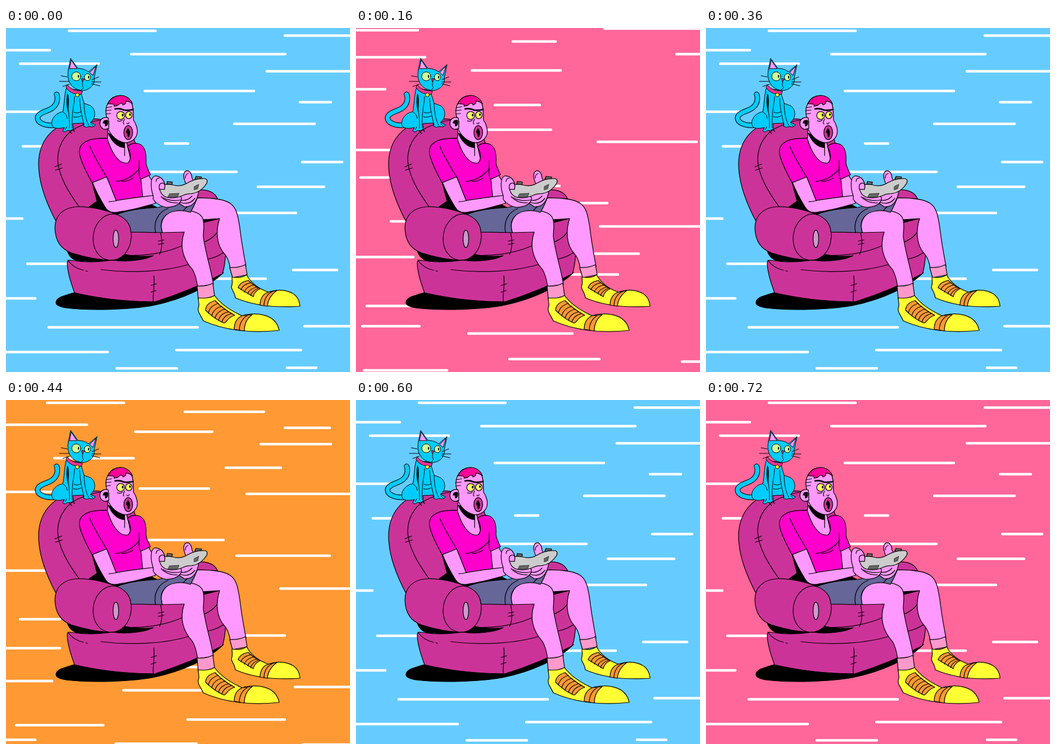
Write an HTML page that moves like this. It is 612x612 px and loops after 760 ms.

```html
<!DOCTYPE html>
<html lang="en">
<head>
<meta charset="utf-8">
<title>Gamer and cat</title>
<style>
  html, body { margin: 0; width: 100%; height: 100%; overflow: hidden; }
  svg { display: block; width: 100vw; height: 100vh; }
  .streaks path { fill: none; stroke: #fff; stroke-width: 4.5; stroke-linecap: round; visibility: hidden; }
  .ink { stroke: #000; stroke-width: 1.25; stroke-linejoin: round; stroke-linecap: round; }
  .fine { stroke-width: 1; }
  .line { fill: none; }
  .black { fill: #000; }
  .solid { stroke: none; }
  .chair { fill: #c39; }
  .skin { fill: #f9f; }
  .shirt { fill: #f0c; }
  .shorts { fill: #669; }
  .sock { fill: #f9c; }
  .shoe { fill: #ff3; }
  .lace { fill: #f93; }
  .cat { fill: #0cf; }
  .pad { fill: #ccc; }
  .key { fill: #666; }
</style>
</head>
<body>
<svg viewBox="0 0 612 612">
  <rect id="sky" width="612" height="612" fill="#6cf"/>
  <g class="streaks">
    <path d="M112 5H266M496 13.500H620M-5 39.500H78M223 46.500H497M25 63.500H165M464 77H620M247 112H441M523 132H578M-5 149H70M406 170.500H549M30 210.500H80M283 205.500H324M527 238.500H598M240 256H410M448 282.500H566M400 329H516M-5 339H29M38 419.500H125M511 430.500H589M370 446H462M-5 481H52M76 532.500H341M531 530.500H620M-5 576.500H181M303 573H525M197 605.500H304M500 604.500H552"/>
    <path d="M-5 4H110M442 1H620M279 24H355M-5 52H123M570 46.500H620M206 75.500H364M-5 109H52M247 137H327M220 181H347M430 202.500H606M-5 217H70M8 266H70M340 281H362M400 311.500H447M62 344H95M434 353H620M410 401.500H503M-5 407.500H102M380 438.500H466M19 494.500H110M11 530.500H113M200 543.500H385M273 589H433M14 609H162M580 593.500H620"/>
    <path d="M73 5H210M318 21H459M-5 44H144M230 56.500H367M496 49.500H576M453 78.500H578M86 103.500H227M391 120.500H489M-5 163.500H90M238 157.500H361M428 167H620M240 249H387M410 277H576M488 335.500H620M-5 303.500H80M25 390H96M400 419H496M-5 441.500H96M-5 500H82M209 516.500H360M514 510.500H620M310 475H350M18 578.500H173M323 568.500H496M-5 604.500H52M195 611.500H339M528 613H620"/>
  </g>

  <g class="ink">
    <!-- chair -->
    <path class="black" d="M89 489C88 479 107 475 124 470L262 480L387 435C362 460 315 483 260 494C205 503 140 502 107 498C96 496 89 493 89 489Z"/>
    <path class="chair" d="M89 344C72 312 58 276 58 242C58 207 76 180 108 169C142 158 168 161 190 166C212 173 226 188 230 205L262 335H110Z"/>
    <path class="line" d="M130 318C112 293 92 262 92 232C93 204 109 183 133 174C145 169 157 165 168 164M87 247L99 242M88 253L100 249M109 179L117 188M114 176L122 184"/>
    <path class="chair" d="M325 295C340 284 369 285 377 305L345 325Z"/>
    <path class="black" d="M107 390C111 408 121 417 140 414L180 422L290 402L230 395Z"/>
    <path class="chair" d="M200 358L275 363L340 338H382C390 350 394 385 391 399C390 415 389 426 385 437C350 456 310 473 265 487C215 487 165 481 122 471C116 455 109 433 109 418Q109 413 113 413Q150 419 190 413C215 417 246 413 262 405C240 408 223 405 207 402Z"/>
    <path class="line" d="M110 413C117 423 128 429 138 431M142 432L145 433M169 430C225 437 288 433 330 419M207 404C252 407 291 398 316 386M223 363H278M275 364C279 380 277 397 273 403M271 379L281 377M271 385L281 383M263 441C265 458 261 473 262 487M258 458L268 455M258 470L267 467M350 382C365 376 376 367 380 355M360 411C374 408 383 403 390 397"/>
    <path class="black" d="M349 341L380 339L352 346Z"/>
    <path class="black" d="M152 270L180 310L250 310L274 322L205 337L186 328L148 318L162 308Z"/>
    <path class="chair" d="M198 332C180 325 153 317 125 318C102 320 87 333 87 356C88 380 98 393 116 400C139 407 160 412 184 413Z"/>
    <path class="chair" d="M155 375C155 349 173 330 192 331C210 331 224 348 223 372C221 396 207 414 184 413C166 411 155 395 155 375Z"/>
    <ellipse cx="195.500" cy="375" rx="5" ry="15.500" fill="#c9c"/>

    <!-- far leg -->
    <path class="skin" d="M327 328C331 316 335 307 341 302C362 302 386 303 399 312C411 320 413 337 416 355C419 382 424 407 427 424L399 428C397 415 394 407 388 401C374 385 373 361 380 339L350 341C344 330 335 327 327 328Z"/>
    <path class="sock" d="M398 426Q414 427 426 421L429 439L403 444Z"/>
    <path class="shoe" d="M402 443Q418 446 428 439C436 454 450 464 467 470C487 463 521 465 523 495C480 498 440 494 408 480C407 470 401 466 401 460C404 455 402 449 402 443Z"/>
    <path class="lace" d="M431 449Q416 452 413 462L440 478Q442 468 452 464Q440 458 431 449Z"/>
    <path class="line" d="M418 466Q421 456 436 453M424 470Q427 460 441 457M430 473Q433 464 446 461M435 476Q438 467 449 463"/>
    <path class="lace" d="M452 493C452 481 458 472 467 470L482 467C472 474 466 484 465 495Z"/>
    <path class="line" d="M459 494C459 482 465 473 474 469"/>

    <!-- near leg and shorts -->
    <path class="skin" d="M278 364C273 347 279 333 295 326C316 321 345 325 350 339C354 349 351 360 351 371C355 401 365 430 369 456L341 460C339 447 335 435 332 430C314 410 309 387 317 363Z"/>
    <path class="shorts" d="M197 332C220 322 247 321 271 319L316 310L333 302L340 303C337 311 333 320 328 328C311 322 289 325 281 337C274 346 276 355 278 364L222 363C222 349 212 337 197 332Z"/>
    <path class="line" d="M266 364C262 345 271 327 288 321M316 324Q326 316 330 303"/>
    <path class="sock" d="M340 459Q357 460 368 454L371 476Q360 482 342 482Z"/>
    <path class="shoe" d="M342 480Q360 482 371 476C382 491 398 502 420 512C445 505 480 508 486 538C434 544 387 537 351 521C346 510 341 506 342 498C345 493 342 488 342 480Z"/>
    <path class="lace" d="M372 485Q356 489 355 502C365 512 376 520 388 525C393 524 393 515 407 511Q386 500 372 485Z"/>
    <path class="line" d="M360 507Q363 494 378 490M366 512Q369 499 384 495M372 516Q375 504 390 500M378 520Q381 508 396 505M384 523Q387 512 401 508"/>
    <path class="lace" d="M406 536C406 524 411 516 420 512L438 510C428 517 424 528 424 539Z"/>
    <path class="line" d="M415 538C415 526 421 516 429 512"/>

    <!-- torso -->
    <path class="skin" d="M236 268L253 260C257 269 263 277 270 284L262 301L240 301Z"/>
    <path class="skin" d="M180 178C182 187 181 194 180 198L195 235L215 243L222 235L214 200Z"/>
    <path class="shirt" d="M180 196C163 196 149 197 139 204C130 210 129 219 132 229C137 246 146 262 153 275L179 265C185 278 190 295 196 307L243 300L240 269L257 261C253 252 249 246 249 239C250 222 247 209 236 206C228 204 220 206 216 211C223 223 223 235 217 240C200 244 186 218 180 196Z"/>
    <path class="line" d="M149 210C157 230 168 246 179 265M239 269C234 258 238 247 237 236M195 273C211 272 227 264 238 249M206 273Q217 273 226 267M211 212V227"/>
    <path class="black" d="M182 187C187 200 197 212 211 213V201Z"/>
    <path class="skin" d="M154 275L179 265C186 281 191 295 196 307C220 303 243 300 262 298L266 312C244 318 222 325 201 327C190 330 181 327 176 318C168 305 160 291 154 275Z"/>
    <path class="line" d="M183 309Q190 309 197 307"/>

    <!-- head -->
    <path class="skin" d="M183 166C175 155 177 140 183 131C192 117 214 117 222 130C228 141 226 153 227 164C232 171 236 183 232 192C227 202 215 206 207 203C197 200 187 192 182 180Z"/>
    <path d="M181 135C186 124 195 120 205 120C215 121 222 127 225 135Q220 130 213 130Q215 135 208 137Q208 133 203 134Q198 139 192 139Q195 134 181 135Z" fill="#f09"/>
    <path class="skin" d="M182 160C174 157 167 162 167 170C168 179 176 183 183 178Z"/>
    <path class="black solid" d="M181 164Q173 162 172 170Q177 168 176 175Q183 176 181 164Z"/>
    <path class="line" d="M178 142L188 140M177 147L187 146M178 153L186 152M198 165Q203 167 207 164M211 162Q207 169 210 171M215 169Q218 173 219 168"/>
    <path class="line" d="M194 144Q202 142 210 146Q218 147 226 145" stroke-width="2.600"/>
    <ellipse cx="218.500" cy="155" rx="5.800" ry="6.300" fill="#ff6"/>
    <circle cx="204" cy="155.500" r="7" fill="#ff6"/>
    <ellipse class="black solid" cx="207.500" cy="155" rx="1.600" ry="2.400"/>
    <ellipse class="black solid" cx="220.500" cy="154" rx="1.500" ry="2.300"/>
    <ellipse cx="217.500" cy="186" rx="7.800" ry="12.500" fill="#c39"/>
    <path class="black solid" d="M217 178Q223 184 219 194Q216 195 216 188Q211 186 217 178Z"/>

    <!-- hands and gamepad -->
    <path class="skin" d="M320 278C317 270 314 262 318 256C323 251 330 255 331 267L343 290C340 309 331 319 317 318L304 309Z"/>
    <path class="line" d="M319 267Q319 260 324 259M310 310Q326 316 336 303M309 306Q322 309 331 299"/>
    <path class="skin" d="M262 299C257 284 256 266 265 263C275 263 282 270 283 282L312 301C314 311 302 319 285 319C274 317 267 312 262 305Z"/>
    <path class="line" d="M267 273Q267 267 273 267M276 300Q287 312 305 311M280 302Q293 309 310 306"/>
    <path class="key" d="M287 273L296 274L295 279L286 278ZM338 264L348 265L346 270L336 269Z"/>
    <path class="pad" d="M273 285C276 278 287 277 296 279C306 282 314 281 322 276C334 269 344 267 354 268C359 269 359 275 355 279C348 289 338 294 328 295C317 294 312 302 297 302C283 303 275 297 273 285Z"/>
    <path class="skin" d="M273 287C271 278 275 275 280 276Q284 278 282 287Z"/>
    <path class="key" d="M291 295L308 294L305 301H288ZM335 282L343 278L341 286L335 288Z" stroke-width=".6"/>
  </g>

  <!-- cat -->
  <g class="ink fine">
    <path class="line" d="M88 173C66 175 53 166 57 157C63 146 87 149 91 129Q92 122 90 118" stroke-width="9.600"/>
    <path class="line" d="M88 173C66 175 53 166 57 157C63 146 87 149 91 129Q92 122 90 118" style="stroke:#0cf" stroke-width="7.400"/>
    <path class="cat" d="M107 108C103 123 104 137 101 149C88 151 79 163 82 173C84 180 95 179 104 177L101 183Q105 187 109 182Q115 184 120 179L119 170L138 169V175Q144 178 148 175Q156 178 159 172L150 168C162 159 159 143 150 138L139 134L132 111Z"/>
    <path class="black solid" d="M109 116Q106 132 110 150Q113 135 111 120Z"/>
    <path class="line" d="M110 119C108 140 114 155 113 178M122 122C121 140 116 155 118 178M131 125C132 147 136 160 139 173M139 134C139 149 142 164 147 173M121 150Q128 153 133 149M120 158Q128 160 134 156M102 150Q108 153 109 161M105 181L108 176M151 171L155 174"/>
    <path d="M109 101Q117 113 136 112L134 118Q115 119 107 106Z" fill="#f39"/>
    <circle cx="127" cy="119" r="3.400" fill="#ff3"/>
    <path class="cat" d="M111 74L115 54L128 72Q139 72 147 78L162 65L157 88C159 99 151 109 139 111C122 112 106 99 111 74Z"/>
    <path class="skin" d="M113 72L116 57L126 72ZM149 79L160 68L155 84Z"/>
    <path class="line" d="M109 87L98 85M112 95L95 95M113 100L101 104M153 96L169 96M152 99L167 103M153 92L165 87M137 95Q134 101 138 106L134 110"/>
    <circle cx="125" cy="86" r="8" fill="#cf9"/>
    <ellipse cx="145" cy="87.500" rx="5.500" ry="6.300" fill="#cf9"/>
    <ellipse class="black solid" cx="129" cy="86" rx="1.200" ry="2.400"/>
    <ellipse class="black solid" cx="147" cy="87.500" rx="1.200" ry="2.400"/>
    <path d="M135 90L140 91L136 95Z" fill="#f39"/>
  </g>
</svg>
<script>
  const STEP = 40, COUNT = 19;
  const colors = ['#6cf', '#f69', '#f93'];
  const sky = document.getElementById('sky');
  const streaks = document.querySelectorAll('.streaks path');

  function draw() {
    const i = Math.floor(performance.now() / STEP) % COUNT;
    // the last step of the loop is pink instead of blue
    sky.setAttribute('fill', colors[i === COUNT - 1 ? 1 : i % 3]);
    streaks.forEach((s, k) => { s.style.visibility = k === i % 3 ? 'visible' : 'hidden'; });
    requestAnimationFrame(draw);
  }
  draw();
</script>
</body>
</html>
```
